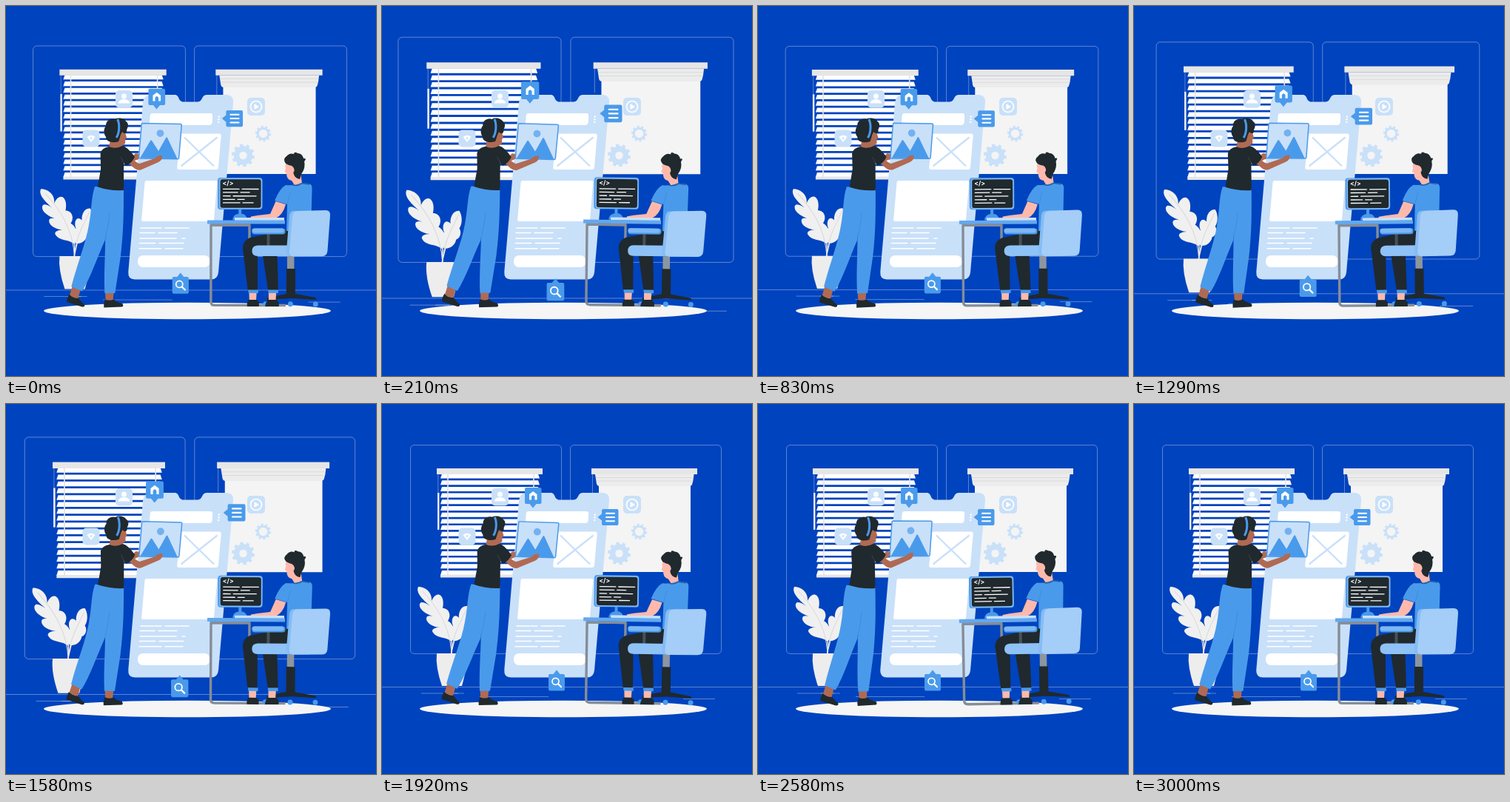
Recreate the animation shown at these times as an HTML page. Size 500 by 500 pixels, loop 3.04 s.

```html
<!DOCTYPE html>
<html lang="en">
<head>
<meta charset="utf-8">
<title>App design team</title>
<style>
  html, body { margin: 0; width: 100%; height: 100%; overflow: hidden; background: #0043be; }
  svg { display: block; width: 100vw; height: 100vh; }
  .blue { fill: #4a9aeb; }
  .pale { fill: #c9e0f9; }
  .mid { fill: #a4cdf7; }
  .white { fill: #fff; }
  .soft { fill: #f0f0f0; }
  .bar { fill: #e6e6e6; }
  .dark { fill: #20292d; }
  .brown { fill: #b06a53; }
  .pink { fill: #ffb9ac; }
  .line { fill: none; stroke: #fff; stroke-linecap: round; stroke-linejoin: round; }
  .faint { fill: none; stroke: #fff; stroke-opacity: .38; stroke-width: .9; }
  .gear { fill: none; stroke: #c9e0f9; }
  .steel { fill: none; stroke: #858d98; stroke-width: 3.4; stroke-linejoin: round; }
  .shade { fill: none; stroke: #2f78c8; stroke-opacity: .5; stroke-width: .8; }
  text { font: 700 8.5px Inter, Roboto, sans-serif; fill: #fff; }
</style>
</head>
<body>
<svg viewBox="0 0 500 500">
  <g id="room">
    <rect class="faint" x="38.5" y="55.5" width="204" height="282" rx="5"/>
    <rect class="faint" x="254.5" y="55.5" width="204" height="282" rx="5"/>
    <path class="faint" d="M-1 382.5H501M53 391H103M132 395.5H225M85 391H111M407 398.5H450"/>

    <g id="blind">
      <path class="soft" d="M75 120h2.4v50H75z"/>
      <path class="faint" d="M75.8 95V121"/>
      <g id="slats" class="white"></g>
      <path d="M89 95V231M205 95V231" stroke="#e3e3e3" stroke-width="1.6"/>
      <path class="bar" d="M79 230.5H213V234.5H79z"/>
      <path class="bar" d="M74 87H217V95H74z"/>
    </g>

    <g id="shade">
      <path class="faint" d="M284.5 95V125"/>
      <path fill="#f4f4f4" d="M293 105H417V227H293z"/>
      <path fill="#ececec" d="M288 95H421.500L420.500 103 419 109Q418 111 415 111H294Q291 111 290 108z"/>
      <path d="M289 99.500H420M290 104H419" stroke="#dadada" stroke-width="1"/>
      <path class="bar" d="M283 87H426V95H283z"/>
    </g>

    <g id="plant">
      <path class="soft" d="M49 247C58 247 68 254 67 266C74 250 86 258 82 276C91 276 94 286 89 293C99 299 99 312 94 321C86 314 74 317 69 309C65 304 74 301 80 302C70 302 59 296 60 289C61 284 70 287 74 288C62 286 49 278 51 270C53 265 61 270 65 273C56 265 45 255 49 247Z"/>
      <path class="soft" d="M115 273C107 272 103 282 104 289C98 282 92 290 96 300C89 300 91 312 96 320C103 321 110 316 111 309C117 307 118 299 115 295C120 288 118 277 115 273Z"/>
      <path d="M55 253C74 274 92 300 94 338M114 278C105 297 95 313 94 338" fill="none" stroke="#d9d9d9" stroke-width="1"/>
      <path d="M94 318V339M98 318L93 339" fill="none" stroke="#e9e9e9" stroke-width="1.4"/>
      <path fill="#ededed" d="M74 337H115Q116 352 108 381H81Q72 355 74 337Z"/>
    </g>
  </g>

  <ellipse cx="245" cy="412" rx="194" ry="11.300" fill="#f5f5f5"/>

  <g id="tiles">
    <rect class="pale" x="148" y="114" width="23" height="23.500" rx="5"/>
    <circle class="white" cx="159.500" cy="122" r="3.400"/>
    <path class="white" d="M151.500 131.500Q153 126 159.500 126T167.500 131.500z"/>
    <rect class="pale" x="103.500" y="167.500" width="23" height="23" rx="5"/>
    <path class="white" d="M109.500 177Q115 172.500 120.500 177L115 184z"/>
    <circle class="pale" cx="115" cy="178.500" r="1.500"/>
    <rect class="pale" x="326" y="124" width="24" height="24" rx="5"/>
    <circle class="line" cx="338" cy="136" r="7.500" stroke-width="1.700"/>
    <path class="white" d="M335.500 132L342 136 335.500 140z"/>
    <g class="gear">
      <circle cx="320.500" cy="202" r="9" stroke-width="7.500"/>
      <circle cx="320.500" cy="202" r="13.700" stroke-width="3.600" pathLength="20" stroke-dasharray="1 1"/>
      <circle cx="347.500" cy="172.500" r="7.300" stroke-width="3"/>
      <circle cx="347.500" cy="172.500" r="9.500" stroke-width="2.600" pathLength="20" stroke-dasharray="1 1"/>
    </g>
  </g>

  <g id="phone">
    <path class="pale" d="M196 120H228C235 120 232 129.500 240 129.500H259C266 129.500 264 120 271 120H297Q308 120 307 131L287 360Q286 369.500 277 369.500H174Q164.500 369.500 165.300 359L185 131Q186 120 196 120Z"/>
    <path class="white" d="M198 145H276Q279.500 145 279.200 148.500L278.600 157Q278.200 161 274.500 161H197Q193.800 161 194.100 157L194.700 148.500Q195 145 198 145Z"/>
    <g class="white"><circle cx="287.800" cy="149.500" r="1.200"/><circle cx="287.500" cy="153.300" r="1.200"/><circle cx="287.200" cy="157" r="1.200"/></g>
    <path class="white" d="M238 172.500H288Q291 172.500 290.700 175.500L287 218Q286.700 221 283.500 221H234Q231 221 231.300 218L235 175.500Q235.300 172.500 238 172.500Z"/>
    <path d="M241 177.500L281 216.500M285.500 177.500L236.500 216.500" stroke="#c9e0f9" stroke-width="2.300"/>
    <path class="white" d="M190 236H283Q285.500 236 285.300 238.500L281 288.500Q280.800 291 278 291H185.500Q183 291 183.200 288.500L187.500 238.500Q187.700 236 190 236Z"/>
    <path class="line" stroke-width="1.500" d="M182 300H210M215 300H247M181 306.500H201M206 306.500H231M181 314H230M238 314H242M180.500 320.500H202M207 320.500H240M180 327.700H210M215 327.700H239"/>
    <rect class="white" x="178" y="337" width="97.500" height="16" rx="7"/>
  </g>

  <g id="bubbles">
    <path class="blue" d="M195 113H213.500Q215.500 113 215.500 115V133Q215.500 135 213.500 135H208.500L204 140.500 199.500 135H195Q193 135 193 133V115Q193 113 195 113Z"/>
    <path class="white" d="M199 122L204.200 118 209.500 122V129.500H206.500V125Q204.200 121.500 202 125V129.500H199z"/>
    <path class="blue" d="M299 142H317.500Q319.500 142 319.500 144V162Q319.500 164 317.500 164H299Q297 164 297 162V157.500L291.500 153 297 148.500V144Q297 142 299 142Z"/>
    <path class="line" stroke-width="2" d="M303 147.800H314M303 153H314M303 158.300H314"/>
    <path class="blue" d="M227 365H231.500L236 359.500 240.500 365H245Q247 365 247 367V385.500Q247 387.500 245 387.500H227Q225 387.500 225 385.500V367Q225 365 227 365Z"/>
    <circle class="line" cx="234.500" cy="374.800" r="4.500" stroke-width="1.700"/>
    <path class="line" stroke-width="2.200" d="M238.200 378.500L242 382.300"/>
  </g>

  <g id="woman">
    <path class="brown" d="M166 207L175 199 181 200 182 205 170 211z"/>
    <path class="pale" stroke="#4a9aeb" stroke-width="1.500" d="M184.500 158.500L235.500 159.500Q237.300 159.600 237.100 161.300L233.500 205Q233.300 206.700 231.600 206.700L181 206Q179.300 206 179.500 204.200L183 160Q183.200 158.500 184.500 158.500Z"/>
    <path class="blue" d="M181 205.500L195 182Q196 180.500 197 182L206 196 216 178Q217 176.500 217.900 178L231.500 206.500z"/>
    <circle cx="208.300" cy="172" r="4.900" fill="#72b1f2"/>
    <path class="brown" d="M90 378L101 383 97 397 86 391zM134 385H146L144.500 400H135z"/>
    <path class="dark" d="M85.500 389.500Q90 395 98 395Q102 400 106.500 404Q106.500 407 103 406.500L82.500 400Q81.500 397 85.500 389.500ZM134 396.500Q140 399 146 396.500Q151 401 157.500 402Q159.500 406 157 406.500L132.500 407.500Q131.500 402 134 396.500Z"/>
    <path class="blue" d="M120 244C115 258 116 275 112 296C108 320 96 350 88.500 379L103 385.500C114 368 123 341 134 316L136 288L158.500 246Z"/>
    <path class="blue" d="M126 246H159C159 280 159 303 155 338L147.500 388H133.500C132 357 135 330 134 303Z"/>
    <path class="shade" d="M134 316C137 302 139 291 140 280"/>
    <path class="brown" d="M141 180L157 180 158 188Q154 195 146 195L139 191z"/>
    <path class="brown" d="M149 164L162 166 161.500 173 163 178 161 180 161 186Q157 189 151 187Z"/>
    <path class="dark" d="M152 183C144 186 134 183 135 177C131 172 132 165 135 162C134 155 142 151 147 153C152 150 160 152 162 156C166 158 165 164 163 167C164 172 160 174 157 170C154 174 154 179 152 183Z"/>
    <path d="M150.500 153C154 160 153 172 149 178" fill="none" stroke="#4a9aeb" stroke-width="3"/>
    <path class="brown" d="M158 206L169 205Q175 211 180 213L201 206Q205 201 211 202Q212 208 206 211L182 221.500Q177 222.500 173 219Z"/>
    <path class="dark" d="M139 190Q148 194 157 189Q164 190 174 204Q170 212 162.500 216L159 212V249Q140 250 124 244.500L128 220 127.500 199Q129 192 139 190Z"/>
    <path d="M159 212L155 204" stroke="#465057" stroke-width=".7"/>
  </g>

  <g id="man">
    <path class="steel" d="M378 404.500H282Q277 404.500 277 399.500V296H329V345"/>
    <path class="blue" d="M314.200 273H318.200V283H314.200zM306 289Q307 281 316 280.500T326 289z"/>
    <rect class="blue" x="286" y="232" width="60.500" height="43" rx="4"/>
    <rect x="288" y="232.800" width="58" height="41.500" rx="4" fill="#84bcf5"/>
    <rect class="dark" x="289.500" y="234.300" width="55" height="38.500" rx="3"/>
    <text x="292.500" y="242.300">&lt;/&gt;</text>
    <path class="line" stroke-width="1.300" d="M293.500 247.500H315M319 247.500H341M293.500 252H313M317 252H329M293.500 256.800H303M307 256.800H338M293.500 261.500H309M313 261.500H322M293.500 266H316M320 266H334"/>

    <g id="chairbase">
      <path fill="#8d969e" d="M380 338H389.500V356H380z"/>
      <path class="dark" d="M379 355H391V389L418 394Q421 396 419 397L386 395 354 397Q351 396 354 394L379 389z"/>
      <g class="blue"><circle cx="351" cy="402.800" r="3.500"/><circle cx="384.500" cy="402.800" r="3.500"/><circle cx="418.500" cy="402.800" r="3.500"/></g>
    </g>

    <path class="pink" d="M328.500 384H339L338 400H329zM355 384H365.500L364.500 400H355z"/>
    <path class="dark" d="M328 397H339L342 400V406H326Q325.500 400 328 397ZM354 397H366L369 401V406H350.500Q350 403 354 397Z"/>
    <path class="dark" d="M346 330L366 326Q367 345 368 385.500H354.500Z"/>
    <path class="dark" d="M398 302Q391 322 366 329L340 335V385.500H327L320 327Q320 317 330 313L378 303Z"/>
    <path class="blue" d="M327 383.500H341V388H328zM354 383.500H368V388H355z"/>

    <path class="pink" d="M379 212Q376 216 378 219L376.500 224 379 226Q379 235 386 236L391 244 400 240 398 226 390 210Z"/>
    <path class="dark" d="M378 213Q373 207 379 203Q383 198 389 200Q389 196 394 199Q400 199 402 206Q407 205 403 210Q405 219 399 227L397 234Q389 233 388 224Q391 219 386 216Q381 215 378 213Z"/>
    <circle class="pink" cx="386.500" cy="222" r="3"/>
    <path class="blue" d="M378 242Q390 243 398 239L409 240Q414 241 413.500 247L412 304H379L380 268 363 263Q370 246 378 242Z"/>
    <path d="M387 241.500Q393 244 400 239.500L410 241" fill="none" stroke="#245f9f" stroke-width="1.500"/>
    <path class="shade" d="M380 268L384 252"/>
    <path class="pink" d="M364.500 264L378 268Q374 283 364 287L335 288Q329 287 331 284.500L340 283 357 281Z"/>

    <path class="pale" d="M309 286H376V290H309z"/>
    <path fill="#62a8f0" d="M272 289.500H377V294.500H272z"/>
    <path class="steel" stroke-width="2" d="M276 296H330"/>

    <path d="M354.500 306V330" stroke="#46515a" stroke-width="4"/>
    <rect class="blue" x="332.500" y="300.500" width="45" height="8" rx="3.500"/>
    <rect x="332.500" y="300.500" width="43" height="6" rx="3" fill="#7db8f4"/>
    <path fill="#8fc2f6" d="M340 323.500H386V338H340Q332.500 338 332.500 331Q332.500 324 340 323.500Z"/>
    <path fill="#86bcf5" d="M389 277H420L410 338H384Q378 338 379 331L383 283Q384 277 389 277Z"/>
    <path class="mid" d="M394 277L432 276Q438.500 276 438 283L434.500 331Q434 338 427 338.200L388 338.500Q382 338 383 331L387 284Q388 277.500 394 277Z"/>
  </g>
</svg>
<script>
  const LOOP = 3040, FRAMES = 73, STEP = 1000 / 24, LEAD = 28;
  const get = id => document.getElementById(id);

  get("slats").innerHTML = Array.from({ length: 16 }, (_, i) => {
    const y = 94.500 + i * 8.700;
    return `<path d="M81 ${y}H211L213 ${y + 6}H79L80 ${y + 3}z"/>`;
  }).join("");

  // Linear interpolation through [position, value] pairs.
  function along(keys, p) {
    const i = keys.findIndex(k => k[0] >= p);
    if (i < 0) return keys[keys.length - 1][1];
    if (i === 0) return keys[0][1];
    const [p0, v0] = keys[i - 1], [p1, v1] = keys[i];
    return v0 + (v1 - v0) * (p - p0) / (p1 - p0);
  }

  const BEAT = [[0, 1], [.1, 1.1], [.3, 1], [.4, 1], [.5, 1.1], [.6, 1], [1, 1]];
  const SWAY = [[0, 0], [.25, 1], [.75, -1], [1, 0]];

  function scale(id, x, y, s) {
    get(id).setAttribute("transform", `translate(${x} ${y}) scale(${s}) translate(${-x} ${-y})`);
  }
  function turn(id, x, y, deg) {
    get(id).setAttribute("transform", `rotate(${deg} ${x} ${y})`);
  }

  function draw(now) {
    const t = now % LOOP;
    const n = Math.min(FRAMES - 1, Math.floor((t + 4) / 41.64));
    const ms = n * STEP + LEAD;
    const beat = along(BEAT, ms / 3000);
    const sway = along(SWAY, ms % 1500 / 1500);
    scale("room", 249, 224, beat);
    scale("bubbles", 256, 250, beat);
    turn("woman", 159, 281, sway);
    turn("man", 355, 302, sway);
  }

  const start = performance.now();
  function tick() {
    draw(performance.now() - start);
    requestAnimationFrame(tick);
  }
  tick();
</script>
</body>
</html>
```
